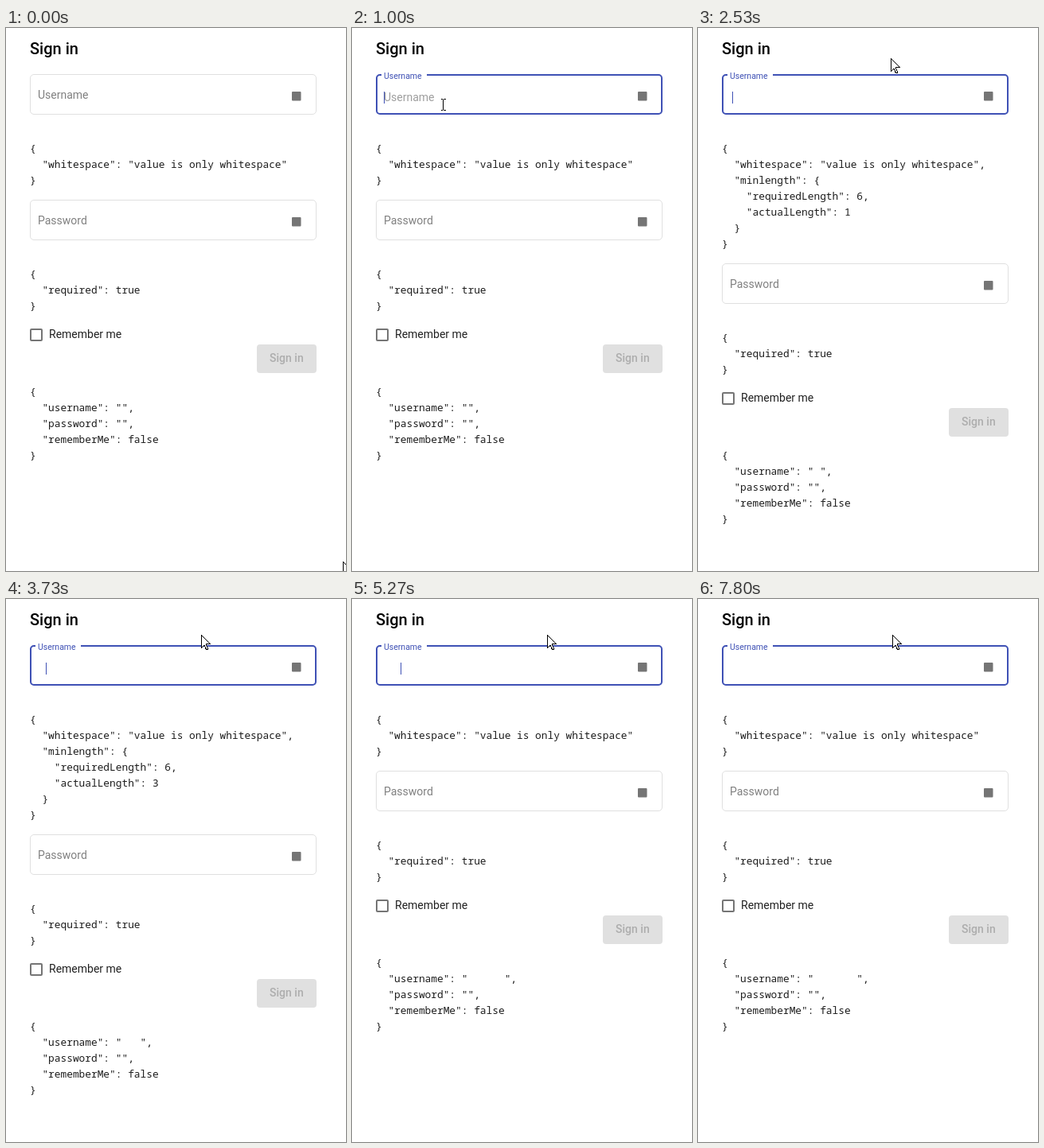
An HTML page that plays this animation: 427 px wide and 683 px high, repeating every 8000 ms.

```html
<!DOCTYPE html>
<html lang="en">
<head>
<meta charset="utf-8">
<title>Sign in</title>
<style>
  html, body { margin: 0; width: 100%; height: 100%; overflow: hidden; background: #fff; }
  svg { display: block; width: 427px; height: 683px; }
  text { font: 400 14px Roboto, sans-serif; fill: #212121; white-space: pre; }
  .title { font-size: 20px; font-weight: 500; fill: #000; }
  .code text { font: 12.83px "Noto Sans Mono", "DejaVu Sans Mono", monospace; fill: #1c1c1c; }
  .label { fill: #808080; }
  .hint { fill: #9e9e9e; }
  .action { font-weight: 500; fill: #adadad; text-anchor: middle; }
  .icon { fill: #757575; }
  .line { fill: none; stroke: #e0e0e0; }
  .thick { fill: none; stroke-width: 2; }
  .pointer { stroke: #000; shape-rendering: crispEdges; }
</style>
</head>
<body>
<svg viewBox="0 0 427 683">
  <text class="title" x="30" y="33">Sign in</text>

  <path id="thin" class="line"/>
  <path id="thick" class="thick"/>
  <text id="hint" class="hint" x="40" y="92">Username</text>
  <text id="label">Username</text>
  <rect id="caret" y="80" width="1" height="15" fill="#3f51b5"/>
  <rect class="icon" x="359" y="80" width="11.5" height="11.5" rx="1"/>
  <g id="nameErrors" class="code"></g>

  <g id="rest">
    <rect class="line" x="30.5" y="216.5" width="359" height="50" rx="4.5"/>
    <text class="label" x="40" y="247">Password</text>
    <rect class="icon" x="359" y="238" width="11.5" height="11.5" rx="1"/>
    <g id="passErrors" class="code"></g>
    <rect x="31" y="379" width="14" height="14" rx="1" fill="none" stroke="#757575" stroke-width="2"/>
    <text x="54" y="390">Remember me</text>
    <rect x="315" y="398" width="75" height="36" rx="4" fill="#e0e0e0"/>
    <text class="action" x="352.4" y="420">Sign in</text>
    <g id="model" class="code"></g>
  </g>

  <path id="arrow" class="pointer" d="M.5 .5V16.5L4 13L6.5 18.5H8.5V17.5L6.5 12.5V11.5H11.5Z" fill="#fff"/>
  <path id="beam" class="pointer" d="M-3 -7H-.8M.8 -7H3M0 -6.5V6.5M-3 7H-.8M.8 7H3" fill="none"/>
</svg>
<script>
const LOOP = 8000, HOVER = 470, FOCUS = 655, BLINK = 530, MIN = 6;
const $ = id => document.getElementById(id);

const keys = [2070, 3200, 3730, 4330, 4870, 5270, 6000];

// pointer glides: begin, end, and where to
const home = { x: 423, y: 671 };
const glides = [
  [0, 330, 117, 114],
  [400, 600, 114, 96],
  [1870, 2130, 217, 59.5],
  [2270, 2530, 242, 38],
  [2530, 2730, 248, 26],
  [3000, 3200, 245, 45],
  [7730, 7800, 244, 45]
];

const set = (el, attrs) => { for (const k in attrs) el.setAttribute(k, attrs[k]); };
const show = (el, on) => { el.style.display = on ? '' : 'none'; };
const mix = (a, b, p) => a + (b - a) * p;
const clamp = v => Math.min(1, Math.max(0, v));

// 15 pictures a second, stamped in whole hundredths
const stamp = k => Math.round(k * 20 / 3) * 10;
function snap(t) {
  let k = Math.ceil(t * .015);
  while (stamp(k) > t) k--;
  return stamp(k);
}

// cubic-bezier(.25, .8, .25, 1)
function ease(x) {
  if (x <= 0) return 0;
  if (x >= 1) return 1;
  let lo = 0, hi = 1;
  for (let i = 0; i < 24; i++) {
    const s = (lo + hi) / 2;
    if (.75 * s * (1 - s) + s ** 3 < x) lo = s; else hi = s;
  }
  const r = 1 - lo;
  return 2.4 * r * r * lo + 3 * r * lo * lo + lo ** 3;
}

function pointerAt(t) {
  let { x, y } = home;
  for (const [begin, end, toX, toY] of glides) {
    const p = 1 - (1 - clamp((t - begin) / (end - begin))) ** 3;
    x = mix(x, toX, p);
    y = mix(y, toY, p);
  }
  return { x: Math.round(x), y: Math.round(y) };
}

function outline(inset, gap) {
  const l = 30 + inset, r = 390 - inset, t = 58 + inset, b = 109 - inset, c = 5 - inset;
  const arc = (dx, dy) => `a${c} ${c} 0 0 1 ${dx} ${dy}`;
  return `M${gap ? 94 : 60} ${t}H${r - c}${arc(c, c)}V${b - c}${arc(-c, c)}H${l + c}${arc(-c, -c)}V${t + c}${arc(c, -c)}` +
    (gap ? 'H37' : 'Z');
}

function block(id, y, lines) {
  const text = lines.join('\n');
  const g = $(id);
  if (g.dataset.text === text) return;
  g.dataset.text = text;
  g.replaceChildren(...lines.map((s, i) => {
    const el = document.createElementNS(g.namespaceURI, 'text');
    set(el, { x: 30, y: y + 20 * i });
    el.textContent = s;
    return el;
  }));
}

function drawField(t, typed) {
  const focused = t >= FOCUS;
  const fade = ease((t - HOVER) / 600);
  set($('thin'), { d: outline(.5, focused), opacity: 1 - fade });
  set($('thick'), { d: outline(1, focused), opacity: fade, stroke: focused ? '#3f51b5' : '#212121' });

  const p = ease((t - FOCUS) / 400);
  const tint = [63, 81, 181].map(v => Math.round(mix(128, v, p)));
  set($('label'), { transform: `translate(40 ${mix(89, 64, p)}) scale(${mix(1, .75, p)})` });
  $('label').style.fill = `rgb(${tint})`;
  show($('hint'), focused && !typed);

  // each key restarts the blink
  const since = t - (typed ? keys[typed - 1] : snap(FOCUS + 20));
  set($('caret'), { x: 40 + Math.floor(typed * 3.5) });
  show($('caret'), focused && Math.floor(since / BLINK) % 2 === 0);
}

function drawState(typed) {
  const short = typed > 0 && typed < MIN;
  const blank = '  "whitespace": "value is only whitespace"';
  block('nameErrors', 156, short
    ? ['{', blank + ',', '  "minlength": {', `    "requiredLength": ${MIN},`, `    "actualLength": ${typed}`, '  }', '}']
    : ['{', blank, '}']);
  block('model', 462, ['{', `  "username": "${' '.repeat(typed)}",`, '  "password": "",', '  "rememberMe": false', '}']);
  set($('rest'), { transform: `translate(0 ${short ? 80 : 0})` });
}

function drawPointer(t) {
  const { x, y } = pointerAt(t);
  const overText = x > 40 && x < 350 && y > 78 && y < 98;
  show($('arrow'), !overText);
  show($('beam'), overText);
  set($('arrow'), { transform: `translate(${x} ${y})` });
  set($('beam'), { transform: `translate(${x + .5} ${y + .5})` });
}

function draw(now) {
  const t = snap(now % LOOP);
  const typed = keys.filter(k => k <= t).length;
  drawField(t, typed);
  drawState(typed);
  drawPointer(t);
}

block('passErrors', 314, ['{', '  "required": true', '}']);
const start = performance.now();
function tick() {
  draw(performance.now() - start);
  requestAnimationFrame(tick);
}
tick();
</script>
</body>
</html>
```
